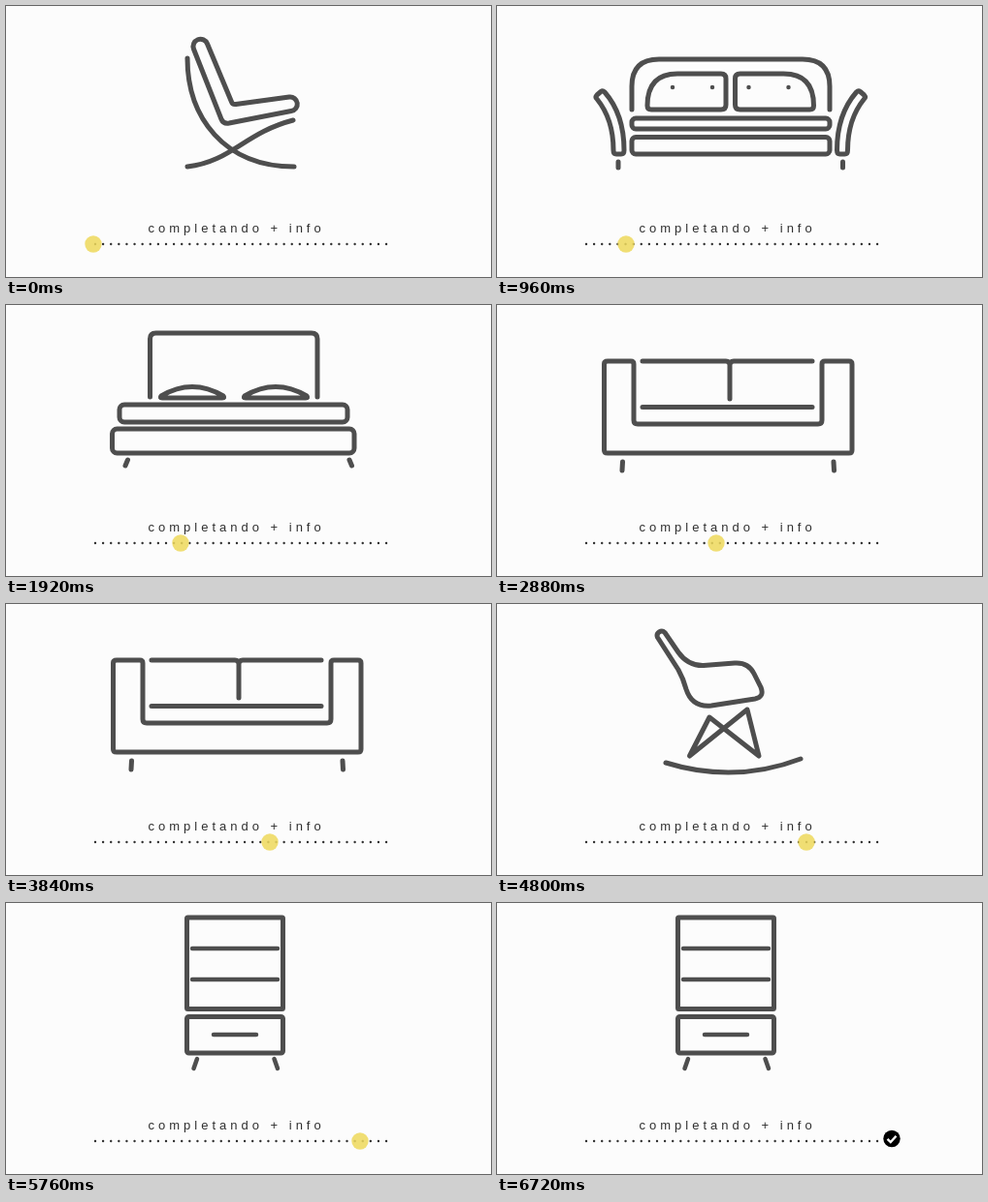
Animation of 500x280 px, one loop 7680 ms. Source, as an HTML page:

```html
<!DOCTYPE html>
<html lang="es">
<head>
<meta charset="utf-8">
<style>
html, body { margin: 0; width: 100%; height: 100%; overflow: hidden; background: #fcfcfc; }
svg { display: block; width: 500px; height: 280px; }
.item { display: none; fill: none; stroke: #4e4e4e; stroke-width: 5; stroke-linecap: round; stroke-linejoin: round; }
.item.on { display: block; }
text { font: 13px "Liberation Sans", Arial, sans-serif; letter-spacing: 4px; fill: #303030; }
</style>
</head>
<body>
<svg viewBox="0 0 500 280">
  <g class="item" id="lounge">
    <path d="M193.500 44.500A7.300 7.300 0 0 1 207.500 39L232.500 99Q233.500 102 237 101.500L292 94A7.300 7.300 0 0 1 294 108.500L230 121Q224 122 222 117Z"/>
    <path d="M187 54C187 115 225 166 297 166M187 166C232 161 246 131 296 118"/>
  </g>

  <g class="item" id="settee">
    <path d="M139 107V83Q139 55 167 55H315Q343 55 343 83V107"/>
    <g id="half">
      <path d="M155 103Q155 70 186 70H231Q236 70 236 75V102Q236 107 231 107H159Q155 107 155 103Z"/>
      <path d="M103 96Q101 94 103 92L107 88.500Q109 87 111 89Q131 112 131 149Q131 153 128 153H123Q120 153 120 149Q120 117 103 96ZM125 161V167"/>
      <path d="M181 84h.01M222 84h.01" stroke-width="4.500"/>
    </g>
    <use href="#half" transform="matrix(-1 0 0 1 481.500 0)"/>
    <rect x="139" y="116" width="204" height="11" rx="4"/>
    <rect x="139" y="135.500" width="204" height="17.500" rx="4"/>
  </g>

  <g class="item" id="bed">
    <path d="M148.500 95V35Q148.500 29 154.500 29H315Q321 29 321 35V95"/>
    <path id="pillow" d="M160 94Q192 75 224 94Q226 96 223 96H161Q158 96 160 94Z"/>
    <use href="#pillow" x="86"/>
    <rect x="117" y="103" width="235" height="18" rx="5"/>
    <rect x="109.500" y="128" width="249.500" height="25" rx="5"/>
    <path d="M125.500 160L123 166M354 160L356.500 166"/>
  </g>

  <g class="item" id="sofa">
    <path d="M114 58H138Q141 58 141 61V119Q141 123 145 123H331Q335 123 335 119V61Q335 58 338 58H363Q366 58 366 61V150Q366 153 363 153H114Q110.500 153 110.500 150V61Q110.500 58 114 58Z"/>
    <path d="M150 58H236Q240 58 240 62V97M240 62Q240 58 244 58H325M150 105.500H325M129.500 162L129 171M347 162L347.500 171"/>
  </g>

  <g class="item" id="rocker">
    <path d="M165.500 34.500A4.600 4.600 0 0 1 173 29.500L187 50Q197 64 213 63.500L245 61Q259 60 265 72L272 86Q276 96 266 98L221 105Q201 107 195 88Q192 77 187 68Z"/>
    <path d="M198.500 157L219 117L270 157L258 109Z"/>
    <path d="M174 164Q245 186 313 160"/>
  </g>

  <g class="item" id="cabinet">
    <rect x="186.500" y="15" width="99" height="94.500" rx="1"/>
    <rect x="186.500" y="117.500" width="99" height="37.500" rx="2"/>
    <path d="M192 47H280M192 79H280M214 136H258M197 161L193.500 171M276.500 161L280 171" stroke-width="4.500"/>
  </g>

  <text x="146.500" y="234">completando + info</text>
  <path d="M92 246H392.500" stroke="#333" stroke-width="2.400" stroke-linecap="round" stroke-dasharray="0 8.110"/>
  <circle id="marker" cy="246" r="8.700" fill="#edd95c" fill-opacity=".86"/>
  <g id="done">
    <circle cx="407" cy="243.500" r="8.700"/>
    <path d="M402.500 243.800L405.800 247L411.500 240.800" fill="none" stroke="#fcfcfc" stroke-width="2.400"/>
  </g>
</svg>
<script>
const STEP = 960;
const order = ["lounge", "settee", "bed", "sofa", "sofa", "rocker", "cabinet", "cabinet"];
const stops = [90, 133, 180, 226, 272, 319, 365];
const $ = id => document.getElementById(id);
const items = document.querySelectorAll(".item");
const start = performance.now();

function draw(now) {
  const step = Math.floor(Math.max(0, now - start) / STEP) % order.length;
  const finished = step === stops.length;
  items.forEach(item => item.classList.toggle("on", item.id === order[step]));
  if (!finished) $("marker").setAttribute("cx", stops[step]);
  $("marker").style.display = finished ? "none" : "";
  $("done").style.display = finished ? "" : "none";
  requestAnimationFrame(draw);
}
draw(start);
</script>
</body>
</html>
```
